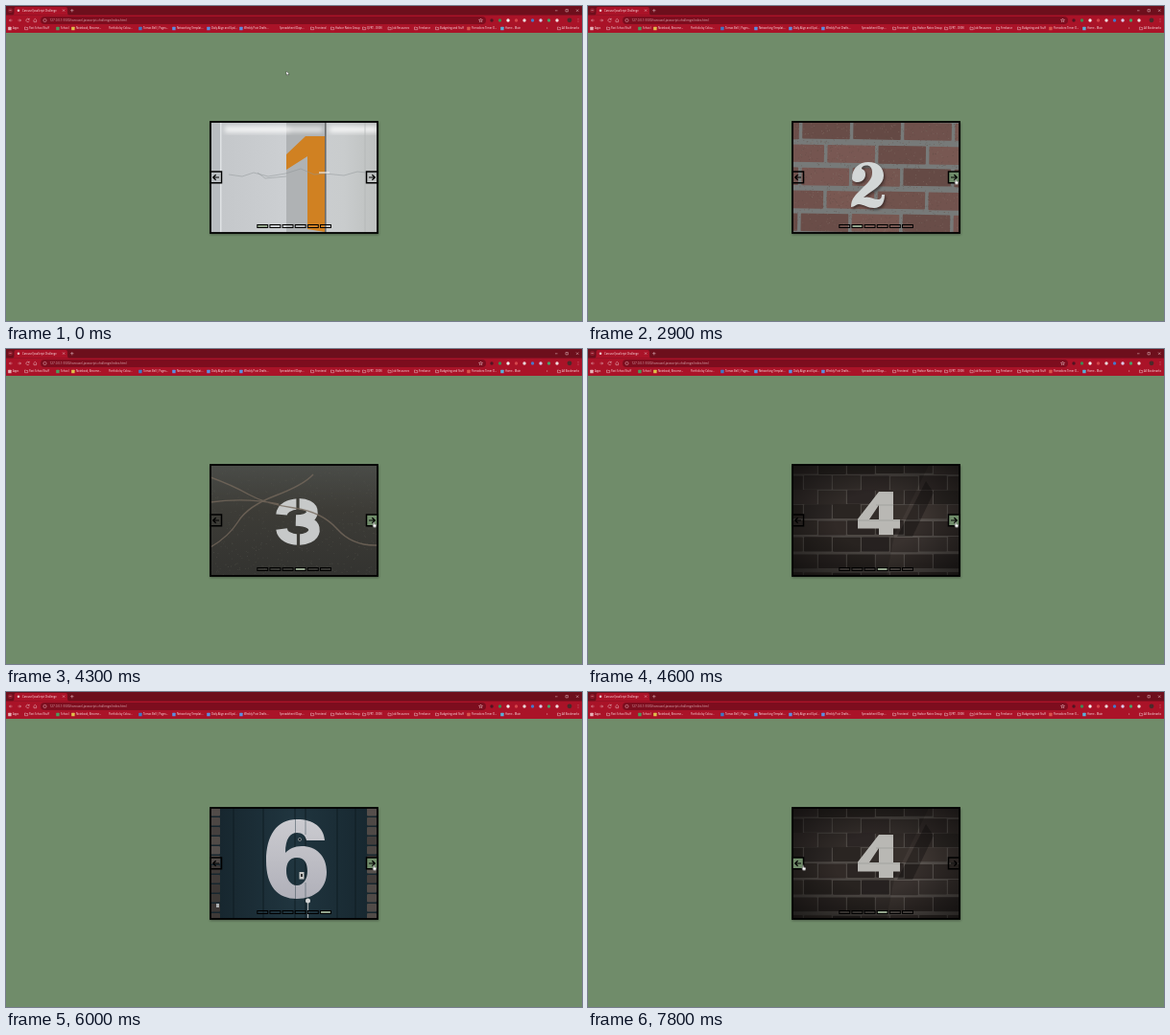
Animation, 600 px wide and 329 px high, one loop 8 s. Source, as an HTML page:

```html
<!DOCTYPE html>
<html lang="en">
<head>
<meta charset="utf-8">
<title>Carousel</title>
<style>
  html, body { margin: 0; width: 100%; height: 100%; overflow: hidden; background: #708c6a; }
  svg { display: block; width: 600px; height: 329px; }
  text { font-family: "Open Sans", sans-serif; }
  .ui { fill: none; stroke: #e9c3c8; stroke-width: .5; }
</style>
</head>
<body>
<svg id="stage" viewBox="0 0 600 329" xmlns="http://www.w3.org/2000/svg">
  <defs>
    <clipPath id="frame"><rect x="213" y="121" width="174" height="116"/></clipPath>
    <filter id="blur" x="-50%" y="-50%" width="200%" height="200%"><feGaussianBlur stdDeviation="2.5"/></filter>
    <filter id="shade" x="-10%" y="-10%" width="120%" height="120%"><feGaussianBlur stdDeviation="1.2"/></filter>
    <filter id="rough" x="-10%" y="-10%" width="120%" height="120%">
      <feTurbulence type="fractalNoise" baseFrequency=".4" numOctaves="2" seed="4"/>
      <feDisplacementMap in="SourceGraphic" scale="4"/>
    </filter>
    <linearGradient id="wall"><stop stop-color="#c3c6c9"/><stop offset=".45" stop-color="#cccfd2"/><stop offset=".8" stop-color="#c9cccd"/><stop offset="1" stop-color="#bdc0bf"/></linearGradient>
    <linearGradient id="field" x2="0" y2="1"><stop stop-color="#4a4c48"/><stop offset=".4" stop-color="#3d3c37"/><stop offset="1" stop-color="#333330"/></linearGradient>
    <linearGradient id="door"><stop stop-color="#16252d"/><stop offset=".5" stop-color="#20353f"/><stop offset="1" stop-color="#16262e"/></linearGradient>
    <linearGradient id="six" x2="0" y2="1"><stop stop-color="#cbcbd0"/><stop offset="1" stop-color="#b0b0b9"/></linearGradient>
    <radialGradient id="vignette" r=".7"><stop offset=".35" stop-opacity="0"/><stop offset="1" stop-opacity=".6"/></radialGradient>
    <path id="two" d="M275 180C275 169 283 163 292 163C302 163 308 169 308 177C308 187 298 191 287 200C293 198 297 202 302 202C305 202 306 200 306 197L309 197C309 206 305 211 298 211C291 211 287 207 282 207C279 207 278 210 274 210C274 201 279 197 285 191C292 184 296 181 296 174C296 169 294 166.500 290 166.500C287 166.500 285 168 285 170C288 171 289 173 289 176C289 180 286 184 281 184C277 184 275 182 275 180Z"/>

    <g id="s1">
      <rect x="213" y="121" width="174" height="116" fill="url(#wall)"/>
      <path d="M213 121h10v116h-10z" fill="#b9bdc1"/>
      <path d="M223 121h1.5v116h-1.5z" fill="#e0e3e5"/>
      <path d="M292 121h40v116h-40z" fill="#afb2b4"/>
      <g fill="#fff" filter="url(#blur)"><path d="M228 126h68v6h-68zM296 127h34v4h-34zM337 126h50v6h-50z" opacity=".85"/></g>
      <path d="M312 136h20v100l-18-3v-76l-22 14v-16z" fill="#d08122"/>
      <path d="M332.8 121v116" stroke="#686b6c" stroke-width="1.6"/>
      <path d="M374 121v116" stroke="#b4b7b6" stroke-width=".7"/>
      <path d="M232 176l14 2 12-4 15 4 18-3 16-5 14 6 11-1 20 2 14-4 20 2M262 174l8 6 22-2" fill="none" stroke="#8f9496" stroke-width=".5"/>
      <path d="M326 174h11" stroke="#eee" stroke-width="1.2"/>
    </g>

    <g id="s2">
      <rect x="213" y="121" width="174" height="116" fill="#777a79"/>
      <g id="bricks2" transform="rotate(1 300 179)"></g>
      <g id="specks2"></g>
      <use href="#two" x="1.5" y="2" fill="#261c1b" opacity=".6" filter="url(#shade)"/>
      <use href="#two" fill="#d3d7d7"/>
    </g>

    <g id="s3">
      <rect x="213" y="121" width="174" height="116" fill="url(#field)"/>
      <g id="specks3"></g>
      <path d="M287 173C288 159 320 158 319 171Q317 179 302 179Q322 180 321 190C319 202 289 203 287 188" fill="none" stroke="#c7c9c9" stroke-width="11.5"/>
      <path d="M304 155v13M304.5 192v15" stroke="#3c3b36" stroke-width="3.2"/>
      <path d="M213 134Q235 142 253 152T300 166T345 188T387 205M213 207Q232 196 242 180T281 153T320 131M213 160Q250 155 284 162" fill="none" stroke="#75685c" stroke-width="1.4" opacity=".8"/>
    </g>

    <g id="s4">
      <rect x="213" y="121" width="174" height="116" fill="#5a5450"/>
      <g id="bricks4"></g>
      <path d="M213 121h142l-36 74-8 42h-98z" fill="#000" opacity=".15"/>
      <path d="M352 138l-30 58h16l22-46z" fill="#000" opacity=".3"/>
      <path d="M303 149h15v29h7v9.5h-7v6.5h-15v-6.5h-22v-10zM303 163l-10 15h10z" fill="#b9b8b4" fill-rule="evenodd"/>
      <path d="M281 179h44M300 163h18" stroke="#8b8884" stroke-width=".5"/>
      <rect x="213" y="121" width="174" height="116" fill="url(#vignette)"/>
    </g>

    <g id="s5">
      <rect x="213" y="121" width="174" height="116" fill="#2c2c2e"/>
      <g id="specks5"></g>
      <g fill="none" stroke="#bcbcbc" filter="url(#rough)">
        <ellipse cx="297" cy="179" rx="43.5" ry="42.5" stroke-width="11"/>
        <path d="M311 156.5H291.5L290.5 175Q313 170 313 185Q312 199 301 199Q294 199 288 194" stroke-width="9"/>
      </g>
    </g>

    <g id="s6">
      <rect x="213" y="121" width="174" height="116" fill="url(#door)"/>
      <path d="M237 121v116M268 121v116M301 121v116M312 121v116M345 121v116M364 121v116" stroke="#0e1a20" stroke-width=".8"/>
      <g id="bricks6"></g>
      <path d="M332 155C331 141 320 133 303 133C282 133 271 150 271 176C271 203 283 216 303 216C322 216 334 205 334 188C334 171 323 161 308 161C300 161 295 164 291 168C291 153 296 147 303 147C309 147 312 150 313 155ZM303 173c8 0 11 6 11 14s-4 15-11 15-11-7-11-15 3-14 11-14z" fill="url(#six)" fill-rule="evenodd"/>
      <path d="M301.5 133v14M312 134v15M301.5 202v14M312 199v16" stroke="#4c5c65" stroke-width=".6"/>
      <circle cx="306" cy="154" r="1.6" fill="#1a262c" stroke="#8c9297" stroke-width=".8"/>
      <path d="M305.5 188h5v7.500h-5z" fill="#c9c9c7"/>
      <path d="M307 190h2v3h-2z" fill="#333"/>
      <path d="M314.5 219v18" stroke="#a9adaf" stroke-width="1.2"/>
      <circle cx="314.5" cy="218" r="2.500" fill="#d4d5d5"/>
      <path d="M219 221h3v4h-3z" fill="#a9adaf"/>
    </g>
  </defs>

  <rect width="600" height="329" fill="#708c6a"/>
  <g id="chrome">
    <rect width="600" height="28" fill="#aa1328"/>
    <rect width="600" height="9.5" fill="#6d0f1c"/>
    <path d="M7 9.5Q8.5 9 8.5 7V3Q8.5 1 10.5 1H62Q64 1 64 3V7Q64 9 65.5 9.5z" fill="#aa1328"/>
    <rect x="36" y="11" width="464" height="8" rx="4" fill="#7d0d1e"/>
    <circle cx="4.5" cy="4.5" r="2.5" fill="#8d1b2b"/>
    <circle cx="13" cy="4.7" r="1.3" fill="#e8c5c9"/>
    <path class="ui" d="M3.5 4l1 1 1-1M59 3.5l2.2 2.2M61.2 3.5L59 5.7M68.8 3v3.4M67.1 4.7h3.4M572 4.8h2.5M583 3.5h2.4v2.4H583zM594 3.5l2.4 2.4M596.4 3.5L594 5.9"/>
    <path class="ui" d="M6.500 15H3.5l1.3-1.4M3.5 15l1.3 1.4M12.5 15h3l-1.3-1.4M15.5 15l-1.3 1.4M24 14a1.7 1.7 0 1 0 .2 1.6M24.2 12.8V14.2H22.8M28.5 15l1.8-1.7 1.8 1.7M29 15v1.7h2.6V15"/>
    <circle class="ui" cx="40.5" cy="15" r="1.6"/>
    <path class="ui" d="M494.5 13l.6 1.3 1.4.1-1.1.9.4 1.4-1.3-.8-1.2.8.3-1.4-1.1-.9 1.4-.1zM596 13v.7M596 14.7v.7M596 16.4v.7"/>
    <circle cx="587" cy="14.8" r="2.4" fill="#4b2a2a"/>
  </g>

  <rect x="212.500" y="122" width="176" height="117" fill="#000" opacity=".3" filter="url(#shade)"/>
  <g id="slides" clip-path="url(#frame)"><use href="#s1"/></g>
  <rect x="213" y="121" width="174" height="116" fill="none" stroke="#000" stroke-width="1.8"/>
  <rect id="next" x="375.5" y="173" width="11.5" height="11.7" fill="#708c6a"/>
  <rect id="prev" x="213" y="173" width="11.5" height="11.7" fill="#708c6a"/>
  <g fill="none" stroke="#000" stroke-width="1.5">
    <path d="M213 173h11.5v11.7H213zM375.5 173H387v11.7h-11.5z"/>
    <path d="M222 179h-6.2M218.6 176.2l-2.9 2.8 2.9 2.8M378 179h6.2M381.4 176.2l2.9 2.8-2.9 2.8" stroke-width="1.2"/>
  </g>
  <rect id="active" x="262" y="229" width="10.5" height="2" fill="#93a48c"/>
  <g id="dots" fill="none" stroke="#000"></g>
  <g id="cursor">
    <path id="arrow" d="M0 0v4.2l1-.9.7 1.5.7-.3-.7-1.5h1.4z" fill="#fff" stroke="#222" stroke-width=".35"/>
    <path id="hand" d="M-.5-1.3q.6-.7 1.1 0v1.7l2 .5q.5.4.3 1.3l-.5 1.6H-.1L-1.5 1.6q.2-.7 1 0z" fill="#fff" stroke="#222" stroke-width=".3"/>
  </g>
</svg>
<script>
const LOOP = 8000;
const $ = id => document.getElementById(id);

function add(parent, tag, attrs, text) {
  const el = document.createElementNS('http://www.w3.org/2000/svg', tag);
  for (const k in attrs) el.setAttribute(k, attrs[k]);
  if (text) el.textContent = text;
  parent.appendChild(el);
  return el;
}

let seed = 11;
const rnd = () => (seed = seed * 16807 % 2147483647) / 2147483647;

// Browser bar
const chrome = $('chrome');
const label = (x, y, s, size = 2.7, fill = '#fbeaec') => add(chrome, 'text', { x, y, 'font-size': size, fill }, s);
label(17, 5.7, 'Carousel JavaScript Challenge', 2.6);
label(45.5, 16, '127.0.0.1:5500/carousel-javascript-challenge/index.html', 3.1, '#d9a9af');
const bookmarks = [
  [7, 'Apps', '#e6b4b8'], [24, 'Past School Stuff', 'folder'], [57, 'School', '#4c9a5c'],
  [73, 'Notebook, Become...', '#e0c04a'], [107, 'Portfolio by Colou...', ''], [143, 'Tomas Bell | Pages...', '#3f78c4'],
  [178, 'Networking Templat...', '#5b8ee0'], [214, 'Daily Align and Upd...', '#5b8ee0'],
  [248, 'Weekly Post Drafts...', '#5b8ee0'], [285, 'Spreadsheet (Days...', ''], [322, 'Frontend', 'folder'],
  [343, 'Harbor Notes Group', 'folder'], [376, 'QVRT - OKIN', 'folder'], [402.5, 'Job Resources', 'folder'],
  [430, 'Freelance', 'folder'], [452, 'Budgeting and Stuff', 'folder'], [485, 'Pomodoro Timer O...', '#d9544d'],
  [520, 'Home - Main', '#58b0d8'], [563, '»', ''], [579, 'All Bookmarks', 'folder']
];
for (const [x, name, icon] of bookmarks) {
  label(x, 24.4, name);
  if (icon === 'folder') add(chrome, 'path', { d: `M${x - 4.5} 22h1.2l.5.5h1.5v2.2h-3.2z`, class: 'ui' });
  else if (icon) add(chrome, 'rect', { x: x - 4.8, y: 21.8, width: 3.4, height: 3.4, rx: .5, fill: icon });
}
['#511522', '#3f8a55', '#f2eeee', '#d4464c', '#e8d9da', '#4878c8', '#d9c9e8', '#4aa06a', '#f0dcde']
  .forEach((fill, i) => add(chrome, 'circle', { cx: 506 + i * 8.5, cy: 15, r: 1.7, fill }));

// Pictures
function bricks(id, tops, height, width, gap, [hue, sat, base], x0 = 150) {
  tops.forEach((y, row) => {
    for (let x = x0 + (row % 2) * width / 2; x < 420; x += width) {
      const light = base + rnd() * 7 - 3;
      add($(id), 'rect', {
        x, y: y + rnd(), width: width - gap, height: height - rnd(), rx: .8,
        fill: `hsl(${hue} ${sat}% ${light}%)`
      });
    }
  });
}
bricks('bricks2', [97, 121, 145, 169, 193, 217, 241], 19, 53, 3.5, [9, 19, 36], 90);
bricks('bricks4', [115, 132, 147, 162, 179, 196, 214, 233], 15.5, 30, 1.2, [18, 10, 19]);
for (const x of [213, 376])
  for (let y = 121; y < 237; y += 10)
    add($('bricks6'), 'rect', { x, y, width: 10, height: 8.5, rx: 1, fill: `hsl(20 6% ${22 + rnd() * 10}%)` });

function specks(id, count, fill) {
  let d = '';
  for (let i = 0; i < count; i++) d += `M${213 + rnd() * 174} ${121 + rnd() * 116}h.8v.8h-.8z`;
  add($(id), 'path', { d, fill, opacity: .6 });
}
specks('specks2', 900, '#5d4a44');
specks('specks2', 500, '#85756c');
specks('specks3', 500, '#54544d');
specks('specks5', 450, '#515154');
specks('specks5', 350, '#1b1b1d');

const DOT_STEP = 13.15;
for (let i = 0; i < 6; i++)
  add($('dots'), 'rect', { x: 261.8 + i * DOT_STEP, y: 228.5, width: 10.9, height: 3 });

// Motion: rows are [ms, value]
function play(el, prop, rows, easing = 'linear') {
  const frames = rows.map(([t, v]) => ({ offset: t / LOOP, [prop]: v, easing }));
  if (rows[0][0] > 0) frames.unshift({ offset: 0, [prop]: rows[0][1], easing });
  const last = rows[rows.length - 1];
  if (last[0] < LOOP) frames.push({ offset: 1, [prop]: last[1] });
  el.animate(frames, { duration: LOOP, iterations: Infinity });
}
const HOLD = 'steps(1, end)';

const steps = [[0, 1], [2700, 2], [3600, 3], [4300, 4], [5000, 5], [5600, 6], [6900, 5], [7400, 4]];
for (const [t, n] of steps.slice(1))
  play(add($('slides'), 'use', { href: '#s' + n }), 'opacity', [[t, 0], [t + 200, 1]], 'ease-in-out');
play($('active'), 'transform', steps.map(([t, n]) => [t, `translateX(${(n - 1) * DOT_STEP}px)`]), HOLD);

const path = [
  [0, 292, 68], [100, 292, 68], [500, 278, 160], [800, 252, 250], [900, 243, 246], [1000, 240, 231],
  [1300, 290, 213], [1700, 366, 184], [1900, 377, 181], [2200, 383, 182.5],
  [6200, 383, 182.5], [6500, 310, 188], [6800, 224, 182.5]
];
play($('cursor'), 'transform', path.map(([t, x, y]) => [t, `translate(${x}px, ${y}px)`]));
play($('next'), 'opacity', [[0, 0], [1900, 1], [6250, 0]], HOLD);
play($('prev'), 'opacity', [[0, 0], [6800, 1]], HOLD);
play($('hand'), 'opacity', [[0, 0], [1900, 1], [6250, 0], [6800, 1]], HOLD);
play($('arrow'), 'opacity', [[0, 1], [1900, 0], [6250, 1], [6800, 0]], HOLD);
</script>
</body>
</html>
```
